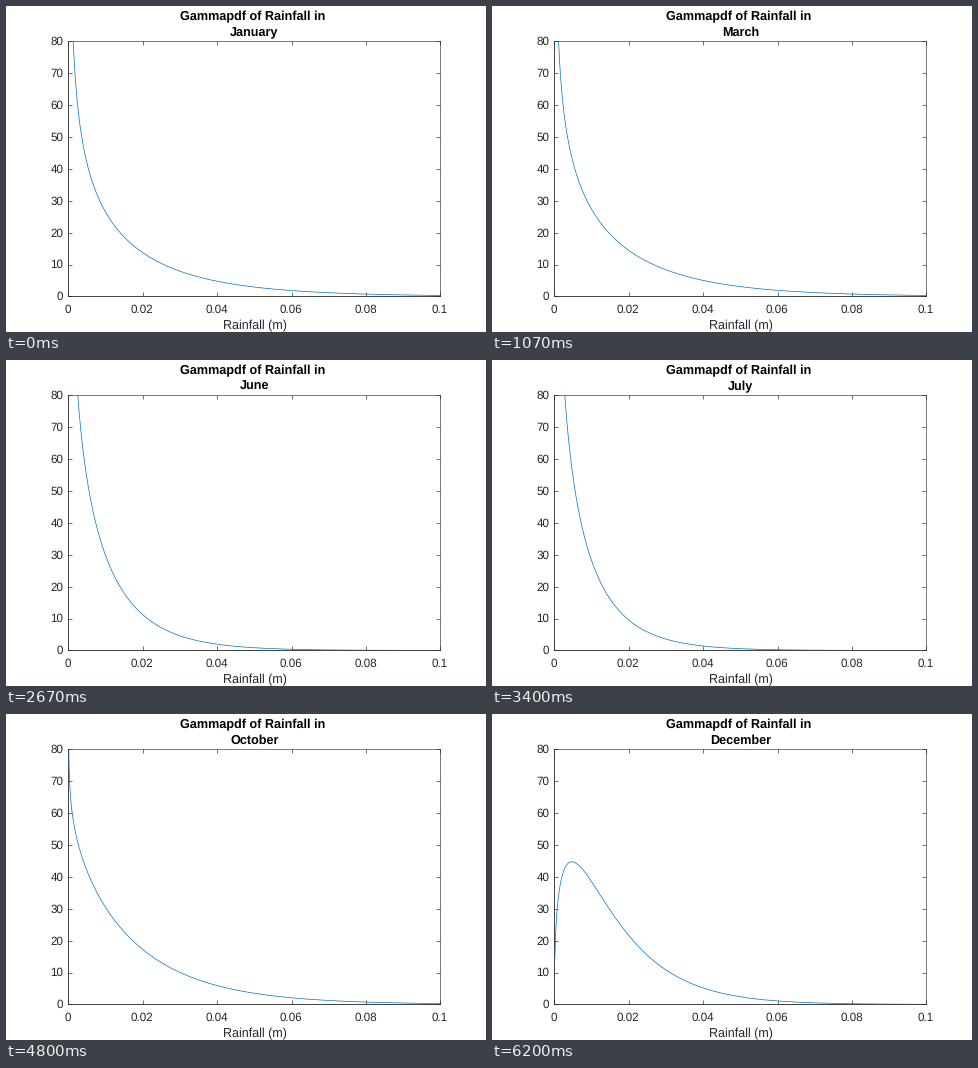
Animation, 480 px wide and 326 px high, one loop 6390 ms. Source, as a matplotlib script:

```python
import math

import matplotlib.pyplot as plt
import numpy as np
from matplotlib.animation import FuncAnimation

W, H, DPI = 480, 326, 64
# Just under half a pixel, so the frame lines snap to these pixels
LEFT, RIGHT, TOP, BOTTOM = 62.45, 434.45, 35.45, 290.45
LOOP_MS, INTERVAL = 6390, 30
MONTH_MS = 533.4
DARK = "#262626"

# Gamma shape and scale for each month
MONTHS = [
    ("January", 0.63, 0.025),
    ("February", 0.95, 0.020),
    ("March", 0.68, 0.024),
    ("April", 1.27, 0.0104),
    ("May", 0.65, 0.0175),
    ("June", 0.70, 0.013),
    ("July", 0.66, 0.0118),
    ("August", 1.10, 0.010),
    ("September", 0.53, 0.025),
    ("October", 0.90, 0.020),
    ("November", 1.21, 0.0164),
    ("December", 1.40, 0.0117),
]

plt.rcParams["font.family"] = "Liberation Sans"
plt.rcParams["text.hinting"] = "none"


def pt(px):
    """Convert pixels to points."""
    return px * 72 / DPI


def gamma_pdf(x, shape, scale):
    norm = scale ** shape * math.gamma(shape)
    return x ** (shape - 1) * np.exp(-x / scale) / norm


fig = plt.figure(figsize=(W / DPI, H / DPI), dpi=DPI, facecolor="white")


def label(x, y, text, size, ha="center", **style):
    """Put text with its baseline at pixel (x, y), counted from the top left."""
    return fig.text(x / W, 1 - y / H, text, fontsize=pt(size), ha=ha,
                    va="baseline", **style)


ax = fig.add_axes([LEFT / W, 1 - BOTTOM / H,
                   (RIGHT - LEFT) / W, (BOTTOM - TOP) / H])
ax.set(xlim=(0, 0.1), ylim=(0, 80),
       xticks=np.linspace(0, 0.1, 6), yticks=range(0, 81, 10))
ax.tick_params(direction="in", top=True, right=True, length=pt(3.7),
               width=pt(0.65), color=DARK, labelbottom=False, labelleft=False)
for side, spine in ax.spines.items():
    width = 0.85 if side in ("left", "bottom") else 0.6
    spine.set(linewidth=pt(width), color=DARK)

for i in range(6):
    x = LEFT + (RIGHT - LEFT) * i / 5
    label(x - 0.5, 306.5, f"{i * 0.02:g}", 11.6, color=DARK)
for i in range(9):
    y = BOTTOM - (BOTTOM - TOP) * i / 8
    label(57.5, y + 3.8, str(i * 10), 11.6, ha="right", color=DARK)
label(249, 323.6, "Rainfall (m)", 12.5, color=DARK)
label(246.5, 14, "Gammapdf of Rainfall in", 12.6, weight="bold", color="black")
month_text = label(248.5, 30, "", 12.6, weight="bold", color="black")

rain = np.linspace(1e-4, 0.1, 1000)
curve, = ax.plot([], [], color="#0072BD", lw=pt(0.7), zorder=3)


def update(frame):
    end = (frame + 1) * INTERVAL - 1
    name, shape, scale = MONTHS[int(end / MONTH_MS)]
    month_text.set_text(name)
    curve.set_data(rain, gamma_pdf(rain, shape, scale))
    return curve, month_text


anim = FuncAnimation(fig, update, frames=LOOP_MS // INTERVAL,
                     init_func=lambda: update(0), interval=INTERVAL,
                     repeat=True, repeat_delay=0, blit=False)
plt.show()
```
